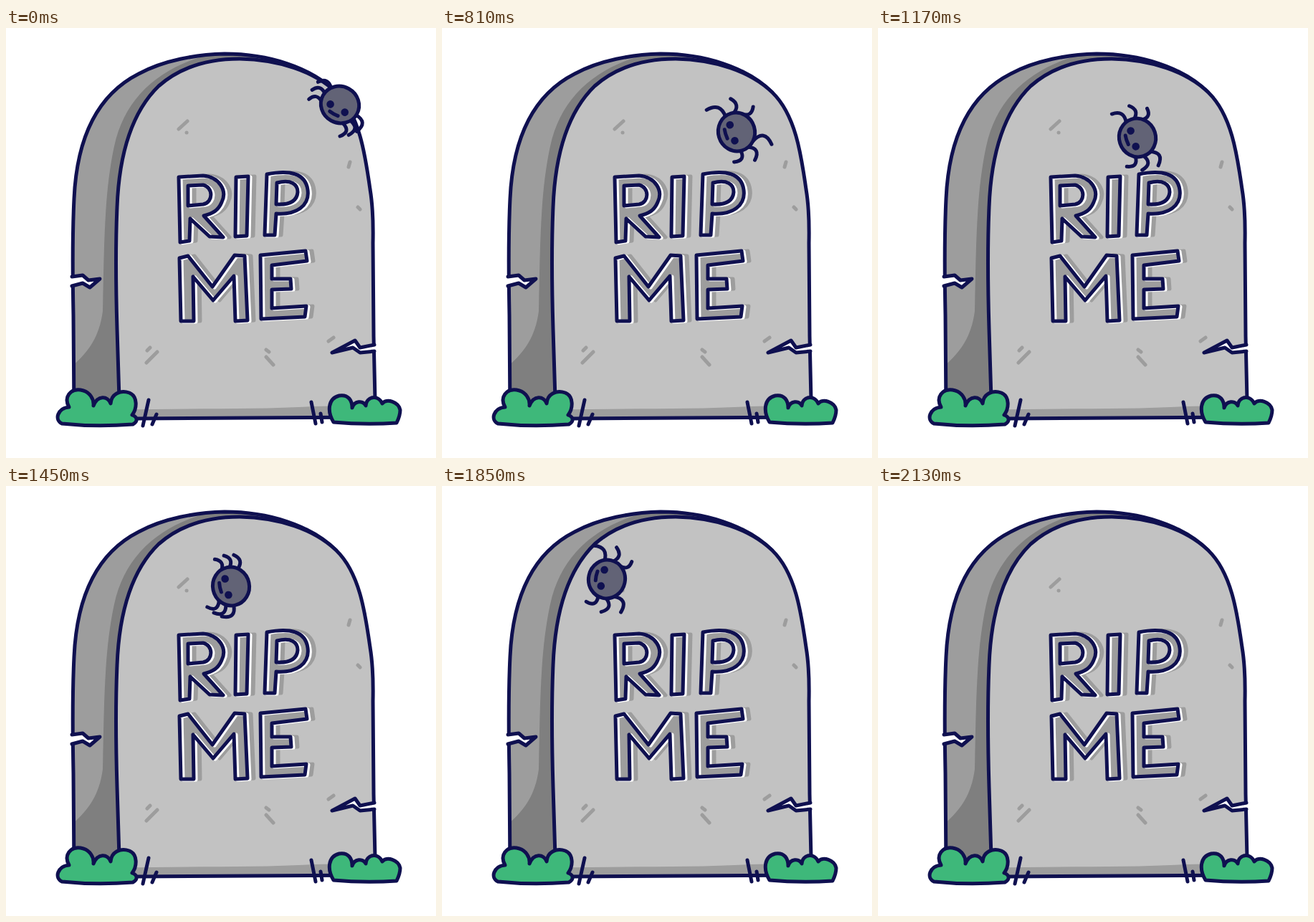
These frames come from a looping animation (600x600 px, 2210 ms). An HTML page:

```html
<!DOCTYPE html>
<html lang="en">
<head>
<meta charset="utf-8">
<title>Spider on a gravestone</title>
<style>
  html, body { margin: 0; width: 100%; height: 100%; overflow: hidden; background: #fff; }
  svg { display: block; width: 100vw; height: 100vh; }
  .ink, .mark, .edge { stroke-width: 5; stroke-linecap: round; stroke-linejoin: round; }
  .ink { stroke: #0f1050; }
  .mark { stroke: #9d9d9d; }
  .edge { stroke: #fff; }
</style>
</head>
<body>
<svg viewBox="0 0 600 600" fill="none">
  <defs>
    <path id="side" d="M95 540 L94 400 Q92 300 95 238 C99 150 130 92 185 64 C220 45 265 37 305 36 C365 36 425 54 461 90 L400 540 Z"/>
    <path id="front" d="M158 518 L155 420 Q152 320 155 250 C158 170 178 115 213 81 C245 53 285 43 326 43 C380 44 430 60 461 90 C493 121 501 175 508 225 Q513 255 512 300 L513 430 L515 520 L512 543 L180 545 Z"/>
    <clipPath id="sideClip"><use href="#side"/></clipPath>
    <clipPath id="frontClip"><use href="#front"/></clipPath>
    <path id="words" fill-rule="evenodd" d="
      M241 208 L275 206 C298 208 309 227 301 243 C296 255 288 259 276 262 L303 292 L284 291 L257 266 L256 297 L243 299 Z
      M254 220 L275 219 C289 222 290 243 275 246 L254 248 Z
      M321 208 L338 207 L336 290 L320 291 Z
      M364 204 C395 198 418 202 421 226 C424 248 405 261 377 259 L375 289 L361 289 Z
      M378 216 C398 211 407 218 407 229 C406 242 395 247 377 246 Z
      M242 321 L254 318 L288 361 L319 317 L333 318 L337 408 L320 409 L318 346 L289 380 L261 347 L262 409 L244 409 Z
      M355 317 L418 311 L420 325 L371 331 L371 350 L397 350 L398 364 L371 365 L371 391 L419 388 L417 403 L356 406 Z"/>
  </defs>

  <use href="#side" fill="#9d9d9d"/>
  <path clip-path="url(#sideClip)" fill="#7f7f7f" d="M310 32 C225 45 167 90 151 165 C137 230 137 300 135 395 C130 432 115 452 92 472 V545 H250 V120 L380 32 Z"/>
  <use href="#side" class="ink"/>

  <use href="#front" fill="#c2c2c2"/>
  <path clip-path="url(#frontClip)" fill="#9d9d9d" d="M150 533 C250 530 340 533 430 528 L520 526 V550 H150 Z"/>
  <use href="#front" class="ink"/>

  <path class="mark" d="M241 141 L253 130 M252 146 h.1 M480 187 L478 194 M491 250 L494 253
    M197 450 L201 446 M196 467 L211 452 M363 449 L367 452 M363 459 L373 470 M450 437 L457 432"/>

  <path fill="#fff" d="M88 348 L107 345 L115 352 L131 350 L117 362 L107 356 L88 360 Z M519 442 L494 446 L487 436 L455 453 L484 446 L494 453 L519 451 Z"/>
  <path class="ink" d="M92 347 L107 345 L115 352 L131 350 L117 362 L107 356 L92 360
    M514 442 L494 446 L487 436 L455 453 L484 446 L494 453 L514 451"/>

  <use href="#words" class="mark" fill="#9d9d9d" x="9"/>
  <use href="#words" fill="#9d9d9d"/>
  <use href="#words" class="edge" x="3" y="1"/>
  <use href="#words" class="ink"/>

  <path class="ink" d="M199 519 L191 555 M210 539 L204 553 M426 522 L432 552 M439 538 L441 550"/>
  <path class="ink" fill="#3eb87a" d="M78 552 C67 547 72 530 88 529 C80 515 90 503 104 505 C117 507 123 518 122 527 C128 512 142 513 146 524 C147 510 160 505 172 509 C184 514 183 531 176 540 C184 543 184 549 177 553 Q125 557 78 552 Z"/>
  <path class="ink" fill="#3eb87a" d="M457 550 C448 535 449 517 465 513 C478 511 483 520 483 530 C486 520 498 519 502 527 C503 514 519 511 525 524 C531 516 548 522 550 533 C550 540 548 545 545 551 Q500 554 457 550 Z"/>

  <g id="spider">
    <path id="legs" class="ink"/>
    <ellipse class="ink" rx="27" ry="25.5" fill="#626376"/>
    <g fill="#0f1050"><circle cx="-12" cy="6" r="5.3"/><circle cx="11" cy="6" r="5.3"/></g>
    <path class="ink" d="M-8 15 Q-2 16 5 15"/>
  </g>
</svg>
<script>
const LOOP = 2210, HIDE = 2130, STRIDE = 1450, RADIUS = 26;
const $ = id => document.getElementById(id);

// Time, x, y and heading of the spider.
const route = [
  [0, 466, 107, 29], [400, 443, 130, 40], [810, 411, 145, 73], [1170, 362, 153, 72],
  [1450, 314, 140, 78], [1850, 230, 130, 102], [2090, 170, 97, 116]
];

// The walk advances in steps of 80 ms, later 40 ms, with one rest.
function stepTime(t) {
  const snap = (from, step) => from + Math.floor((t - from) / step) * step;
  if (t < 650) return Math.min(snap(0, 80), 480);
  return t < 970 ? snap(650, 80) : snap(970, 40);
}

function locate(t) {
  const i = Math.max(1, route.findIndex(key => key[0] >= t));
  const a = route[i - 1], b = route[i];
  const k = (t - a[0]) / (b[0] - a[0]);
  return a.map((v, n) => v + (b[n] - v) * k);
}

function polar(degrees, length) {
  const a = degrees * Math.PI / 180;
  return [length * Math.cos(a), length * Math.sin(a)];
}

function leg(hipAngle, footAngle, length, bend) {
  const [hx, hy] = polar(hipAngle, RADIUS), [x, y] = polar(footAngle, length);
  const cx = (hx + x) / 2 - (y - hy) * bend, cy = (hy + y) / 2 + (x - hx) * bend;
  return `M${hx} ${hy}Q${cx} ${cy} ${x} ${y}`;
}

// Legs bunch up at the start of a stride and spread out in its middle.
function legsPath(t) {
  const s = Math.abs(Math.sin(Math.PI * t / STRIDE));
  return [-1, 0, 1].map(n => {
    const length = 44 + s * (3 - 5 * n);
    return leg(187 + 26 * n, 179 + 8 * s + n * (18 + 26 * s), length, .6) +
      leg(28 - 48 * s + 24 * n, 45 - 62 * s + n * (16 + 22 * s), length, -.75);
  }).join('');
}

function render(time) {
  const t = time % LOOP;
  $('spider').style.display = t < HIDE ? '' : 'none';
  if (t >= HIDE) return;
  const now = stepTime(t);
  const [, x, y, heading] = locate(now);
  $('spider').setAttribute('transform', `translate(${x} ${y}) rotate(${heading})`);
  $('legs').setAttribute('d', legsPath(now));
}

const start = performance.now();
function tick() {
  render(performance.now() - start);
  requestAnimationFrame(tick);
}
tick();
</script>
</body>
</html>
```
